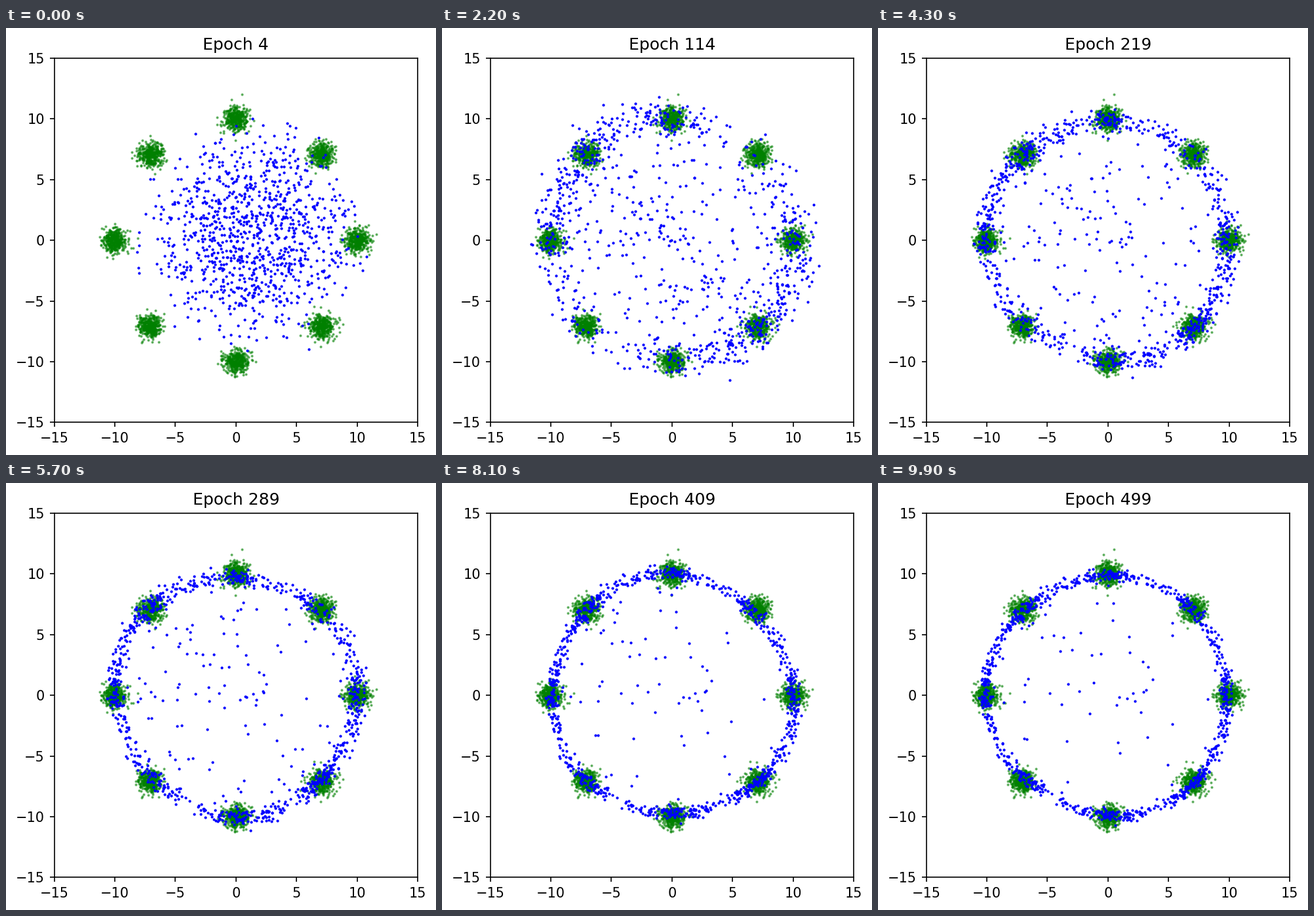
These frames come from a looping animation (656 by 650 pixels, 10 s). A matplotlib script:

```python
import numpy as np
import matplotlib.pyplot as plt
from matplotlib.animation import FuncAnimation

W, H, DPI = 656, 650, 150
LEFT, BOTTOM, SIDE = 73.6, 49.6, 554.4
FRAMES, INTERVAL = 100, 100
N = 1000
RING_START = 12

rng = np.random.default_rng(7)


def polar(r, a):
    return np.column_stack([r * np.cos(a), r * np.sin(a)])


def real_samples(per_mode=400, std=0.5):
    """Eight Gaussian modes on a circle of radius 10."""
    centres = polar(10, np.arange(8) * np.pi / 4)
    return np.repeat(centres, per_mode, axis=0) + rng.normal(0, std, (8 * per_mode, 2))


# Fixed latent noise: angle quantile, radius quantile, radial jitter
v, u = rng.random(N), rng.random(N)
jitter = rng.normal(0, 1, N)
g = np.sqrt(-2 * np.log(1 - u))
gx, gy = polar(g, 2 * np.pi * v).T

phi_grid = np.linspace(0, 2 * np.pi, 1441)


def ring(t):
    """Samples gather on the circle, first along a diagonal, later at the modes."""
    fade = np.exp(-(t - 22) / 25)
    inner = 0.06 + 0.3 * fade
    thick = 0.22 + 0.55 * fade
    lean = 0.2 + 0.35 * fade
    pull = 2.2 - 1.4 * fade
    size = 9.9 + 2.2 * np.exp(-(t - RING_START) / 4)

    def diagonal(phi):
        return lean * np.cos(2 * (phi - np.radians(140)))

    modes = np.exp(2 * (np.cos(8 * phi_grid) - 1))
    density = (1 + diagonal(phi_grid)) * (1 + pull * modes)
    cdf = np.concatenate([[0], np.cumsum(density[1:] + density[:-1])])
    phi = np.interp(v, cdf / cdf[-1], phi_grid)

    r = size + 0.5 * diagonal(phi) + 0.2 * np.sin(3 * phi + t / 9)
    r = r * np.minimum(1, (u / inner) ** 0.6) + thick * jitter
    return polar(r, phi)


# Early poses: round blob, wide cloud, tall column, then the first ring
blob = polar(12 * np.tanh(g / 2.8), 2 * np.pi * v) + [1.3, 0.5]
wide = np.column_stack([0.5 + 6.5 * gx, 6 * gy])
tall_y = 17 * np.tanh(0.85 * gy)
tall = np.column_stack([-0.4 + 0.065 * tall_y + 2.15 * gx, tall_y])
poses = [blob, wide, tall, ring(RING_START)]
STEP = RING_START / (len(poses) - 1)


def generated(t):
    if t >= RING_START:
        return ring(t)
    k, part = divmod(t / STEP, 1)
    a, b = poses[int(k)], poses[int(k) + 1]
    return a + (b - a) * part


fig = plt.figure(figsize=(W / DPI, H / DPI), dpi=DPI, facecolor="white")
ax = fig.add_axes([LEFT / W, BOTTOM / H, SIDE / W, SIDE / H])
ax.set(xlim=(-15, 15), ylim=(-15, 15),
       xticks=range(-15, 16, 5), yticks=range(-15, 16, 5))
ax.scatter(*real_samples().T, s=1, c="green", alpha=0.5)
fake = ax.scatter(*generated(0).T, s=1, c="blue")
title = ax.set_title("")


def update(i):
    fake.set_offsets(generated(i))
    title.set_text(f"Epoch {4 + 5 * i}")
    return fake, title


anim = FuncAnimation(fig, update, frames=FRAMES, interval=INTERVAL,
                     init_func=lambda: update(0), repeat=True, repeat_delay=0)
plt.show()
```
